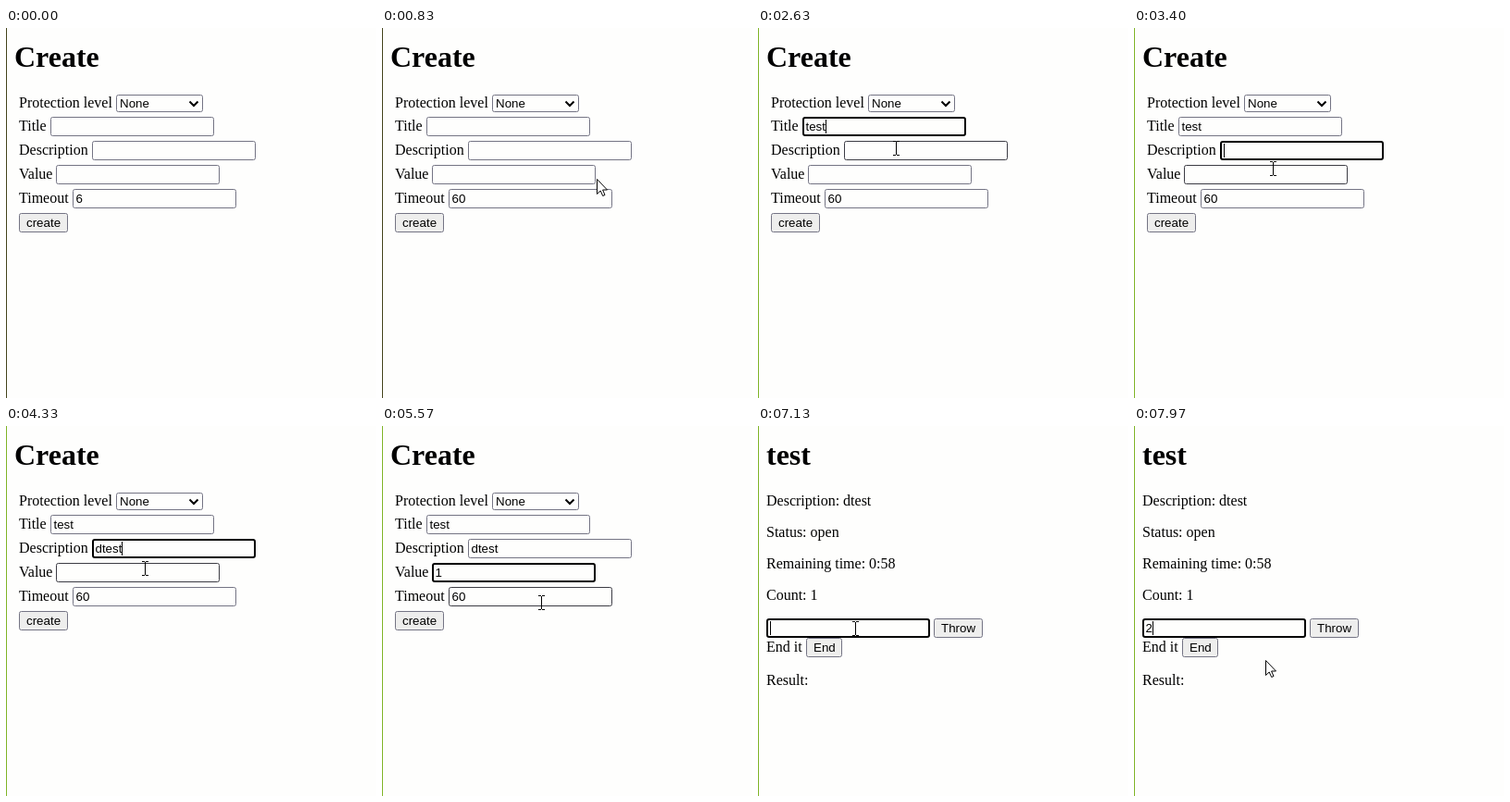
These frames come from a looping animation (400 px wide and 400 px high, 8000 ms). An HTML page:

```html
<!DOCTYPE html>
<html lang="en">
<head>
<meta charset="utf-8">
<title>Form walkthrough</title>
<style>
  html, body { margin: 0; width: 100%; height: 100%; overflow: hidden; background: #fefefd; }
  svg { display: block; width: 100%; height: 100%; }
  text { white-space: pre; fill: #000; }
</style>
</head>
<body>
<svg id="stage" viewBox="0 0 400 400"></svg>
<script>
const LOOP = 8000;
const SUBMIT = 5930, TICK = 7040, ACTIVATE = 1620;
const PAPER = '#fefefd';
const SERIF = '16px "Liberation Serif", "Times New Roman", serif';
const HEAD = 'bold 32px "Liberation Serif", "Times New Roman", serif';
const SANS = '13.333px "Liberation Sans", Arial, sans-serif';
const FIELD_W = 177, ROW_H = 21;

const stage = document.getElementById('stage');
const ruler = document.createElement('canvas').getContext('2d');

function measure(s, font) {
  ruler.font = font;
  return ruler.measureText(s).width;
}

// Controls sit one space after their label
const after = (x, label) => Math.round(x + measure(label + ' ', SERIF));

// Each field is focused, typed into, then blurred by the next one
const form = [
  { label: 'Title', value: 'test', focus: ACTIVATE, type: 1900, blur: 2800 },
  { label: 'Description', value: 'dtest', focus: 2800, type: 3420, blur: 4520 },
  { label: 'Value', value: '1', focus: 4520, type: 4960, blur: SUBMIT },
  { label: 'Timeout', value: '60', type: 0 }
].map((f, i) => ({ ...f, x: after(14, f.label), y: 96 + 26 * i }));
const entry = { value: '2', focus: 7120, type: 7680, blur: LOOP, x: 9, y: 208 };

// Pointer gestures
const enter = { x: 402, y: 268 };
const moves = [
  { at: 230, time: 1000, x: 140, y: 106 },
  { at: 2300, time: 300, x: 149, y: 130 },
  { at: 3000, time: 500, x: 150, y: 154 },
  { at: 4650, time: 400, x: 172, y: 191 },
  { at: 5600, time: 230, x: 44, y: 211 },
  { at: 6000, time: 400, x: 125, y: 237 },
  { at: 6700, time: 350, x: 105, y: 219 },
  { at: 7250, time: 450, x: 142, y: 253 }
];

const ease = u => u * u * (3 - 2 * u);
const clamp = (v, lo, hi) => Math.max(lo, Math.min(hi, v));

function pointerAt(t) {
  let { x, y } = enter;
  for (const m of moves) {
    const k = ease(clamp((t - m.at) / m.time, 0, 1));
    x += (m.x - x) * k;
    y += (m.y - y) * k;
  }
  return { x: Math.round(x), y: Math.round(y) };
}

const over = (p, x, y, w, h = ROW_H) => p.x >= x && p.x < x + w && p.y >= y && p.y < y + h;
const text = (x, y, s, font = SERIF) => `<text x="${x}" y="${y}" style='font:${font}'>${s}</text>`;

function frame(x, y, w, h, color, fill = PAPER, weight = 1) {
  const d = weight / 2;
  return `<rect x="${x + d}" y="${y + d}" width="${w - weight}" height="${h - weight}" rx="2" ` +
    `fill="${fill}" stroke="${color}" stroke-width="${weight}"/>`;
}

const edge = hover => hover ? '#3c3c44' : '#747484';

function field(f, t, p) {
  const { x, y, value } = f;
  const shown = value.slice(0, clamp(Math.floor((t - f.type) / 130) + 1, 0, value.length));
  const focused = t >= f.focus && t < f.blur;
  const color = focused ? '#000' : edge(over(p, x, y, FIELD_W));
  const typedAt = f.type + 130 * (value.length - 1);
  const lit = focused && (t < typedAt || (t - typedAt) % 1060 < 530);
  const caretX = Math.round(x + 3.5 + measure(shown, SANS));
  return frame(x, y, FIELD_W, ROW_H, color, PAPER, focused ? 2 : 1) +
    text(x + 3.5, y + 15, shown, SANS) +
    (lit ? `<rect x="${caretX}" y="${y + 3}" width="1" height="15"/>` : '');
}

function button(x, y, label, p) {
  const w = Math.floor(measure(label, SANS) + 16);
  const hover = over(p, x, y, w);
  return frame(x, y, w, ROW_H, edge(hover), hover ? '#e4e4e4' : '#eeeeed') +
    text(x + 8, y + 15, label, SANS);
}

function select(label, value, p) {
  const x = after(14, label), y = 72;
  return text(14, y + 14, label) + frame(x, y, 94, 19, edge(over(p, x, y, 94, 19))) +
    text(x + 4, y + 14, value, SANS) +
    `<path d="M${x + 79.5} ${y + 7.5}l4.5 4.5l4.5 -4.5" fill="none" stroke="#000" stroke-width="2"/>`;
}

function cursor(p, fields) {
  const beam = fields.some(f => over(p, f.x, f.y, FIELD_W));
  const shape = beam
    ? 'd="M-3 -7.5H0M1 -7.5H4M.5 -7V7M-3 7.5H0M1 7.5H4" fill="none"'
    : 'd="M.5 .5V16.5L4.2 13L6.7 18.5L9 17.5L6.6 12H11.5Z" fill="#fff"';
  return `<path transform="translate(${p.x} ${p.y})" ${shape} stroke="#000"/>`;
}

function createPage(t, p) {
  return text(9, 42, 'Create', HEAD) + select('Protection level', 'None', p) +
    form.map(f => text(14, f.y + 15, f.label) + field(f, t, p)).join('') +
    button(14, 200, 'create', p);
}

function detailPage(t, p) {
  const lines = ['Description: dtest', 'Status: open',
    'Remaining time: 0:' + (t < TICK ? 59 : 58), 'Count: 1'];
  return text(9, 42, 'test', HEAD) +
    lines.map((s, i) => text(9, 86 + 34 * i, s)).join('') +
    field(entry, t, p) + button(entry.x + FIELD_W + 4, entry.y, 'Throw', p) +
    text(9, 244, 'End it') + button(after(9, 'End it'), 229, 'End', p) +
    text(9, 280, 'Result:');
}

function render(t) {
  const p = pointerAt(t), second = t >= SUBMIT;
  stage.innerHTML = `<rect width="400" height="400" fill="${PAPER}"/>` +
    `<rect width="1" height="400" fill="${t < ACTIVATE ? '#44441c' : '#80b428'}"/>` +
    (second ? detailPage(t, p) : createPage(t, p)) + cursor(p, second ? [entry] : form);
}

const start = performance.now();
function loop() {
  render((performance.now() - start) % LOOP);
  requestAnimationFrame(loop);
}
loop();
</script>
</body>
</html>
```
